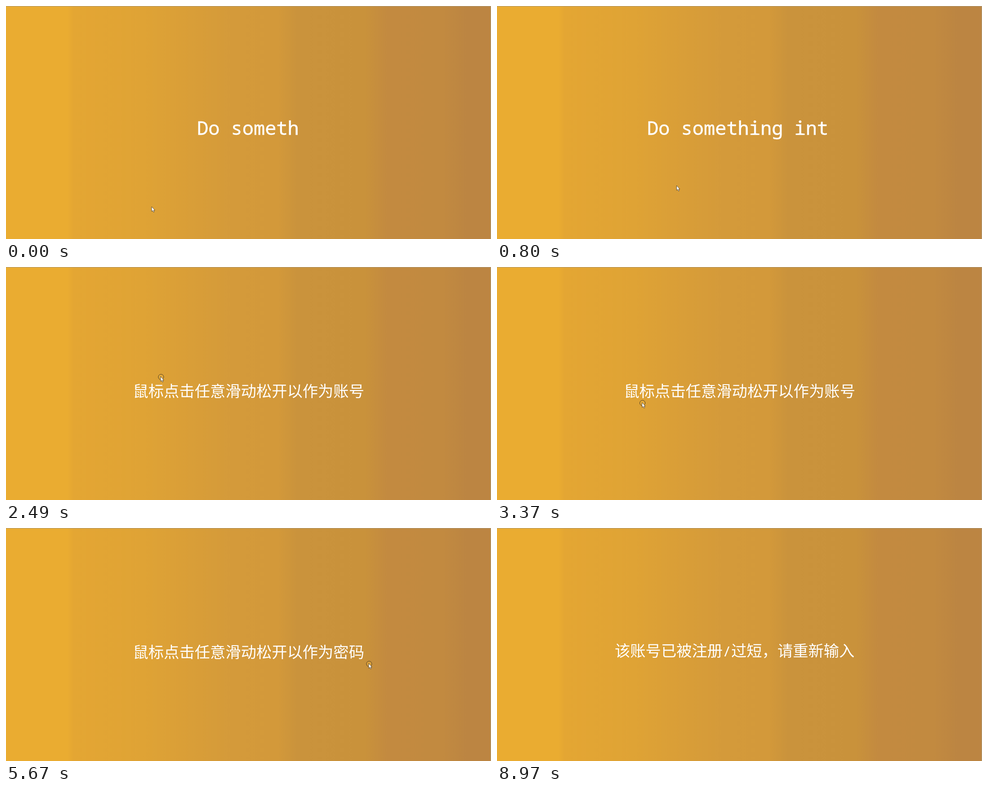
An HTML page for the animation above (9.5 s loop, 1079x519 px).

```html
<!DOCTYPE html>
<html lang="zh-CN">
<head>
<meta charset="utf-8">
<title>Gesture sign-up</title>
<style>
  html, body { margin: 0; width: 100%; height: 100%; overflow: hidden; }
  body {
    position: relative;
    background: linear-gradient(90deg,
      #eaac31 12.6%, #e4a633 14%, #dfa335 28%, #d49a3a 46.5%, #d3993a 56%,
      #ca933c 60%, #c9923b 74%, #c38a40 78.7%, #c28a40 90%, #bc8542 95%);
  }
  svg { position: absolute; left: 0; top: 0; display: block; }
  text { fill: #fff; white-space: pre; }
  .mono { font-family: "Noto Sans Mono", "DejaVu Sans Mono", monospace; font-size: 42px; stroke: #fff; stroke-width: .5; }
  .han { font-family: "Noto Sans CJK SC", "Noto Sans CJK", sans-serif; font-size: 34.3px; }
  .slash { font-family: "Noto Sans Mono", monospace; font-size: 31.5px; }
</style>
</head>
<body>
<svg width="1079" height="519" viewBox="0 0 1079 519">
  <path d="M0 .5H1079M1078.5 0V519" stroke="#ab9a7c"/>
  <text id="typed" class="mono" y="287.3"></text>
  <text id="account" class="han" x="282.5" y="289">鼠标点击任意滑动松开以作为账号</text>
  <text id="password" class="han" x="282.5" y="289">鼠标点击任意滑动松开以作为密码</text>
  <text id="error" class="han" x="262" y="286">该账号已被注册<tspan class="slash">/</tspan>过短，请重新输入</text>
  <g id="pointer">
    <circle id="ring" cx="1" cy="1" r="6" fill="#f0b43c" fill-opacity=".45" stroke="#4b3a20"/>
    <path d="M0 0V10.6L2.4 8.5L4.2 12.3L6 11.4L4.4 7.8H7.4Z" fill="#fff" stroke="#3d3020" stroke-width=".8"/>
  </g>
</svg>
<script>
const LOOP = 9500;
const PHRASE = 'Do something interesting';
const TYPE_END = 1250, ACCOUNT_END = 3500, PASSWORD_END = 6070;
const $ = id => document.getElementById(id);
const [typed, account, password, error, pointer, ring] =
  ['typed', 'account', 'password', 'error', 'pointer', 'ring'].map($);

// Pointer glides between these stops and circles while drawing
const STOPS = [
  { t: 40, x: 324, y: 447 }, { t: 800, x: 399, y: 400 },
  { t: 1400, x: 718, y: 408 }, { t: 1550, x: 718, y: 408 },
  { t: 2100, x: 250, y: 239 }, { t: 3370, x: 322, y: 302 },
  { t: 4150, x: 843, y: 271 }, { t: 5670, x: 807, y: 302 },
  { t: 5900, x: 778, y: 232 }, { t: 6110, x: 741, y: 252 },
  { t: 8500, x: 741, y: 252 }, { t: 8750, x: 930, y: 310 }, { t: 8970, x: 1090, y: 490 }
];
const STROKES = [
  { from: 2250, to: 3370, release: 3480, cx: 297, cy: 263, rx: 52, ry: 44, turns: 1.58, end: 1.06 },
  { from: 4210, to: 5670, release: 5780, cx: 797, cy: 278, rx: 48, ry: 24, turns: 2.27, end: 1.36 }
];

const ramp = (t, from, to) => Math.max(0, Math.min(1, (t - from) / (to - from)));
const show = (node, opacity) => { node.style.opacity = Number(opacity); };

function orbit(s, t) {
  const angle = s.end - s.turns * 2 * Math.PI * (1 - ramp(t, s.from, s.to));
  return [s.cx + s.rx * Math.cos(angle), s.cy + s.ry * Math.sin(angle)];
}

function glide(t) {
  const next = STOPS.findIndex(stop => stop.t > t);
  const b = STOPS.at(next);
  const a = next > 0 ? STOPS[next - 1] : b;
  const k = a === b ? 1 : ramp(t, a.t, b.t);
  return [a.x + (b.x - a.x) * k, a.y + (b.y - a.y) * k];
}

function tipAt(t) {
  const stroke = STROKES.find(s => t >= s.from && t < s.to);
  if (stroke) return orbit(stroke, t);
  // Wait at the starting point until the press
  const waiting = STROKES.find(s => t < s.from && t > s.from - 150 && glide(t)[0] !== 0 && t >= STOPS.findLast(p => p.t < s.from).t);
  return waiting ? orbit(waiting, waiting.from) : glide(t);
}

function render(t) {
  const count = 9 + Math.floor(Math.min(t, TYPE_END) / 110);
  typed.textContent = PHRASE.slice(0, count);
  typed.setAttribute('x', 425 - 13 * (count - 9));

  show(typed, t < TYPE_END);
  show(account, t < ACCOUNT_END && ramp(t, TYPE_END, TYPE_END + 120));
  show(password, t >= ACCOUNT_END && t < PASSWORD_END);
  show(error, ramp(t, PASSWORD_END, PASSWORD_END + 160));

  pointer.setAttribute('transform', `translate(${tipAt(t)})`);
  show(ring, STROKES.some(s => t >= s.from && t < s.release));
}

const start = performance.now();
function frame() {
  render((performance.now() - start) % LOOP);
  requestAnimationFrame(frame);
}
frame();
</script>
</body>
</html>
```
